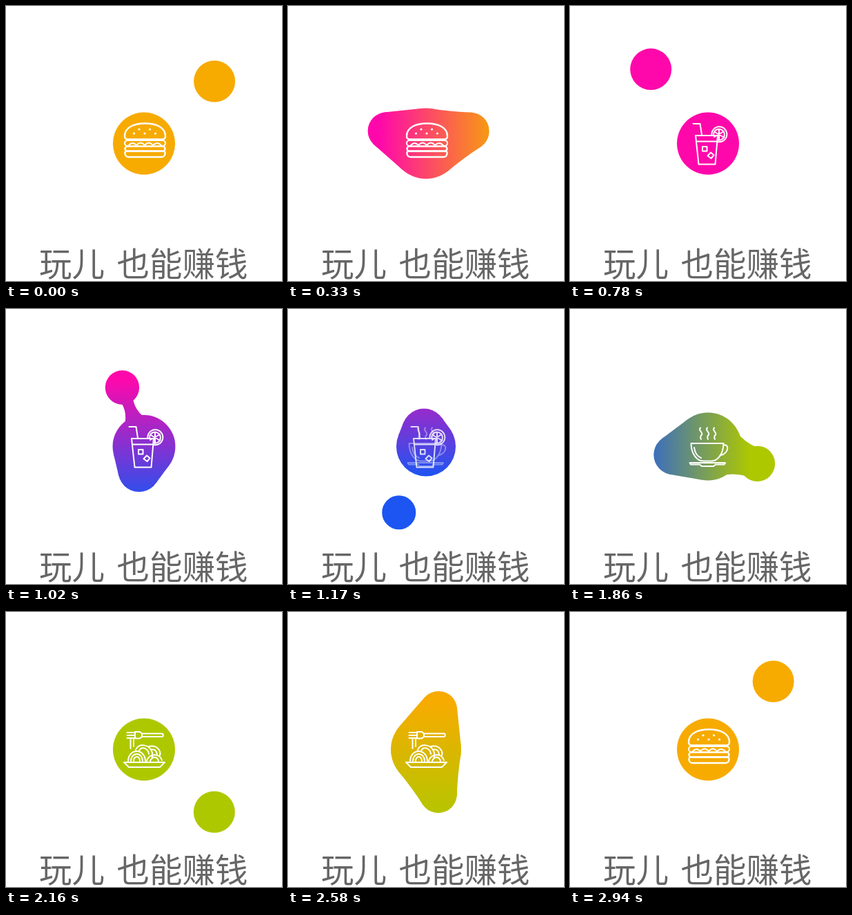
Write an HTML page with a canvas that moves like this. It is 400x397 px and loops after 2970 ms.

```html
<!DOCTYPE html>
<html lang="zh">
<head>
<meta charset="utf-8">
<style>
  html, body { margin: 0; width: 400px; height: 397px; overflow: hidden; background: #fff; }
  canvas, svg { position: absolute; left: 0; top: 0; }
  .icon { fill: none; stroke: #fff; stroke-width: 2.4; stroke-linecap: round; stroke-linejoin: round; }
  .dots { fill: #fff; stroke: none; }
  .thin { stroke-width: 2; }
  text { font: 300 47.5px "Noto Sans CJK SC", "Noto Sans CJK", sans-serif; fill: #666; }
</style>
</head>
<body>
<canvas width="400" height="397"></canvas>
<svg width="400" height="397">
  <g class="icon">
    <path d="M172 188C172 176 184 169.500 201.500 169.500S231 176 231 188Q231 192.500 226.500 192.500H176.500Q172 192.500 172 188Z"/>
    <path d="M176 202a4 4 0 0 1 0-8H227a4 4 0 0 1 0 8M178 201q5.500-6 11 0q6-7 12 0q6-7 12 0q6-6 12 0" class="thin"/>
    <rect x="172.500" y="202.500" width="58" height="7" rx="3.500"/>
    <path d="M175 209.500H228Q231 209.500 230.500 213Q230 218 225 218H178Q173 218 172.500 213Q172 209.500 175 209.500Z"/>
    <g class="dots"><circle cx="193" cy="178" r="1.600"/><circle cx="208.500" cy="178" r="1.600"/><circle cx="185.500" cy="184" r="1.600"/><circle cx="201" cy="184" r="1.600"/><circle cx="216.500" cy="184" r="1.600"/></g>
  </g>
  <g class="icon thin">
    <path d="M178.500 170H188.500L191 186M182 187H214L210.500 228.500H186.500ZM183 195.500H213"/>
    <path d="M205.500 187A11 11 0 1 1 214 196M208 187A8 8 0 1 1 214 193.500M216 178V193M209 181.500L223.500 190M209 189L223 181"/>
    <path d="M192 203h6.500v6.500h-6.500zM204 211.500l4.500 3.800l-4 4.700l-5-3.800z"/>
  </g>
  <g class="icon thin">
    <path d="M175.500 194H222.500C222.500 209 214 219.500 205 219.500H193C184 219.500 175.500 209 175.500 194Z"/>
    <path d="M222 197C231 193 231 209 217.500 211.500M180 200C181 208 185 213 190 215"/>
    <path d="M173.500 222H225L223.500 224.500H211L208 227H191L188 224.500H175Z"/>
    <path d="M189 171.500c-4 4 4 6 2 10q-3 3-1 6.500M199 171.500c-4 4 4 6 2 10q-3 3-1 6.500M209 171.500c-4 4 4 6 2 10q-3 3-1 6.500"/>
  </g>
  <g class="icon thin">
    <path d="M197 175.500H225.500a2.300 2.300 0 0 1 0 4.600H197M175.500 174H187M175.500 178H187M175.500 182H187M187 173H194L197 175.500V180L194 182.500H187Z"/>
    <path d="M180.500 184V197M185 184V194"/>
    <path d="M171 217H230L223 224H178Z"/>
    <path d="M177 215a12.500 14 0 0 1 25 0M181 215a8.500 10 0 0 1 17 0M185 215a4.500 6 0 0 1 9 0"/>
    <path d="M188 199C191 189 208 190 212 203Q213 208 211 212M193 200C197 193 206 197 207 205M207 194C219 191 225 201 223 207M210 199C216 197 219 202 219 206M204 215C207 204 223 203 226 214M209 215C212 208 219 208 221 215"/>
  </g>
  <text x="48" y="390">玩儿</text>
  <text x="160.500" y="390">也能赚钱</text>
</svg>
<script>
const ctx = document.querySelector('canvas').getContext('2d');
const icons = document.querySelectorAll('svg > .icon');
const colors = ['#f7ab00', '#ff08ab', '#1c55f2', '#aec800'];
const LOOP = 2970, STEP = 750, MERGE = 330, SPAN = 180;

// Incoming ball: time relative to the merge, x, y, radius
const path = [
  [-420, 90, -102, 30], [-375, 96.5, -96.5, 30], [-330, 102, -90, 30], [-300, 107, -83, 30],
  [-270, 110, -79, 30], [-190, 113, -62, 30], [-90, 95, -39, 24.5], [0, 61, -18, 27],
  [90, 23, -3, 32], [160, 0, 0, 35], [240, 0, 0, 35], [420, 0, 0, 35]
];
const clamp = v => Math.max(0, Math.min(1, v));

function ballAt(time) {
  let i = 1;
  while (i < path.length - 3 && path[i + 1][0] < time) i++;
  const [a, b, c, d] = path.slice(i - 1, i + 3);
  const span = c[0] - b[0], u = clamp((time - b[0]) / span);
  return [1, 2, 3].map(n => {
    const m0 = (c[n] - a[n]) / (c[0] - a[0]) * span;
    const m1 = (d[n] - b[n]) / (d[0] - b[0]) * span;
    return b[n] + u * (m0 + u * (3 * (c[n] - b[n]) - 2 * m0 - m1 + u * (2 * (b[n] - c[n]) + m0 + m1)));
  });
}

function disc(x, y, r) {
  ctx.beginPath();
  ctx.arc(x, y, r, 0, 2 * Math.PI);
  ctx.fill();
}

// Ball plus the neck that joins it to the centre disc of radius R
function drawBall(x, y, r, R) {
  disc(x, y, r);
  const dist = Math.hypot(x, y);
  if (dist <= Math.abs(R - r) || dist >= 100) return;
  const pinch = 1 - 2 * clamp((dist - 66) / 34);
  const cos = (R - r) / dist, sin = Math.sqrt(1 - cos * cos);
  const x0 = R * cos, y0 = R * sin, x1 = dist + r * cos, y1 = r * sin;
  const mx = (x0 + x1) / 2, my = (y0 + y1) / 2 * pinch;
  ctx.save();
  ctx.rotate(Math.atan2(y, x));
  ctx.beginPath();
  ctx.moveTo(x0, y0);
  ctx.quadraticCurveTo(mx, my, x1, y1);
  ctx.lineTo(x1, -y1);
  ctx.quadraticCurveTo(mx, -my, x0, -y0);
  ctx.restore(); // fill unrotated so the gradient stays aligned
  ctx.fill();
}

function draw(ms) {
  const t = ms + STEP / 2 - MERGE;
  const turn = Math.floor(t / STEP), tau = t - turn * STEP - STEP / 2;
  const now = turn % 4, next = (turn + 1) % 4;
  const R = 45 + 6 * Math.cos(tau / 40) * Math.exp(-((tau / 110) ** 2));
  const drift = 4 * Math.exp(-((tau / 40) ** 2));

  ctx.clearRect(0, 0, 400, 397);
  ctx.save();
  ctx.translate(200, 198.5);
  ctx.rotate(-turn * Math.PI / 2);
  const mix = 0.62 + tau * 0.0012 + 0.6 * (tau / 250) ** 3;
  const fill = ctx.createLinearGradient(SPAN * mix, 0, SPAN * (mix - 1), 0);
  fill.addColorStop(0, colors[now]);
  fill.addColorStop(1, colors[next]);
  ctx.fillStyle = fill;
  disc(0, 0, R);
  const [inX, inY, inR] = ballAt(tau), [outX, outY, outR] = ballAt(-tau);
  drawBall(inX + drift, inY, inR, R);
  drawBall(drift - outX, outY, outR, R);
  ctx.restore();

  const fadeOut = 1 - clamp((tau - 70) / 110), fadeIn = clamp((tau - 50) / 110);
  icons.forEach((icon, i) => {
    icon.style.opacity = i === now ? fadeOut : i === next ? fadeIn : 0;
  });
}

const start = performance.now();
function tick() {
  draw((performance.now() - start) % LOOP);
  requestAnimationFrame(tick);
}
tick();
</script>
</body>
</html>
```
